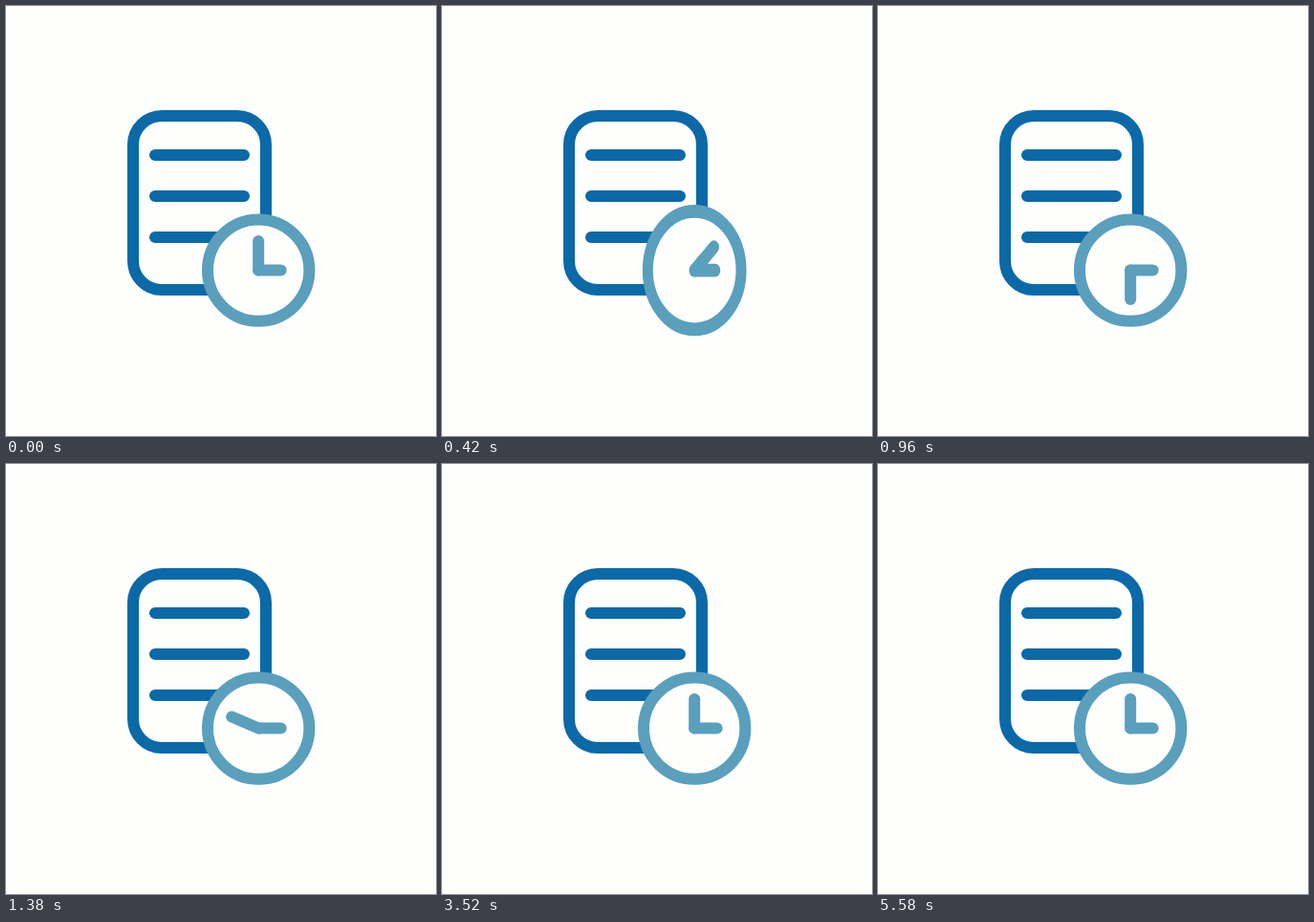
These frames come from a looping animation (450x450 px, 5680 ms). An HTML page:

```html
<!DOCTYPE html>
<html lang="en">
<head>
<meta charset="utf-8">
<title>Document with clock</title>
<style>
html, body { margin: 0; width: 100%; height: 100%; overflow: hidden; background: #fefefd; }
svg { display: block; width: 100vw; height: 100vh; }
g { fill: none; stroke-width: 12; stroke-linecap: round; }
</style>
</head>
<body>
<svg viewBox="0 0 450 450">
  <g stroke="#0b69a8">
    <rect x="133" y="115" width="139" height="182" rx="30"/>
    <path d="M156 156H249M156 199H249M156 242H249"/>
  </g>
  <g id="clock" stroke="#5a9fbc">
    <circle r="53.2" fill="#fefefd"/>
    <path d="M0 0H23.5"/>
    <path id="hand" d="M0 0V-30.5"/>
  </g>
</svg>
<script>
const LOOP = 5680, TURN = 40;
const clock = document.getElementById('clock');
const hand = document.getElementById('hand');

// Squash and stretch: step, x scale, y scale
const keys = [
  [0, 1, 1], [3, 1.22, .78], [5, 1.02, .82], [8, .9, 1.17],
  [13, 1.08, 1.08], [15, 1.22, .9], [17, .95, 1.14], [20, 1, 1]
];

const ease = p => p * p * (3 - 2 * p);

// Three uneven steps in every 140 ms
function stepAt(t) {
  const r = t % 140;
  return Math.floor(t / 140) * 3 + (r >= 120 ? 2 : r >= 20 ? 1 : 0);
}

function scaleAt(n) {
  const i = keys.findIndex(k => k[0] > n);
  if (i < 0) return [1, 1];
  const a = keys[i - 1], b = keys[i];
  const p = ease((n - a[0]) / (b[0] - a[0]));
  return [1, 2].map(j => a[j] + (b[j] - a[j]) * p);
}

function draw(now) {
  const n = stepAt(now % LOOP);
  const angle = 360 * ease(Math.min(n / TURN, 1));
  clock.setAttribute('transform', `translate(264.2 276.6) scale(${scaleAt(n)})`);
  hand.setAttribute('transform', `rotate(${angle})`);
}

const start = performance.now();
function tick() {
  draw(performance.now() - start);
  requestAnimationFrame(tick);
}
tick();
</script>
</body>
</html>
```
